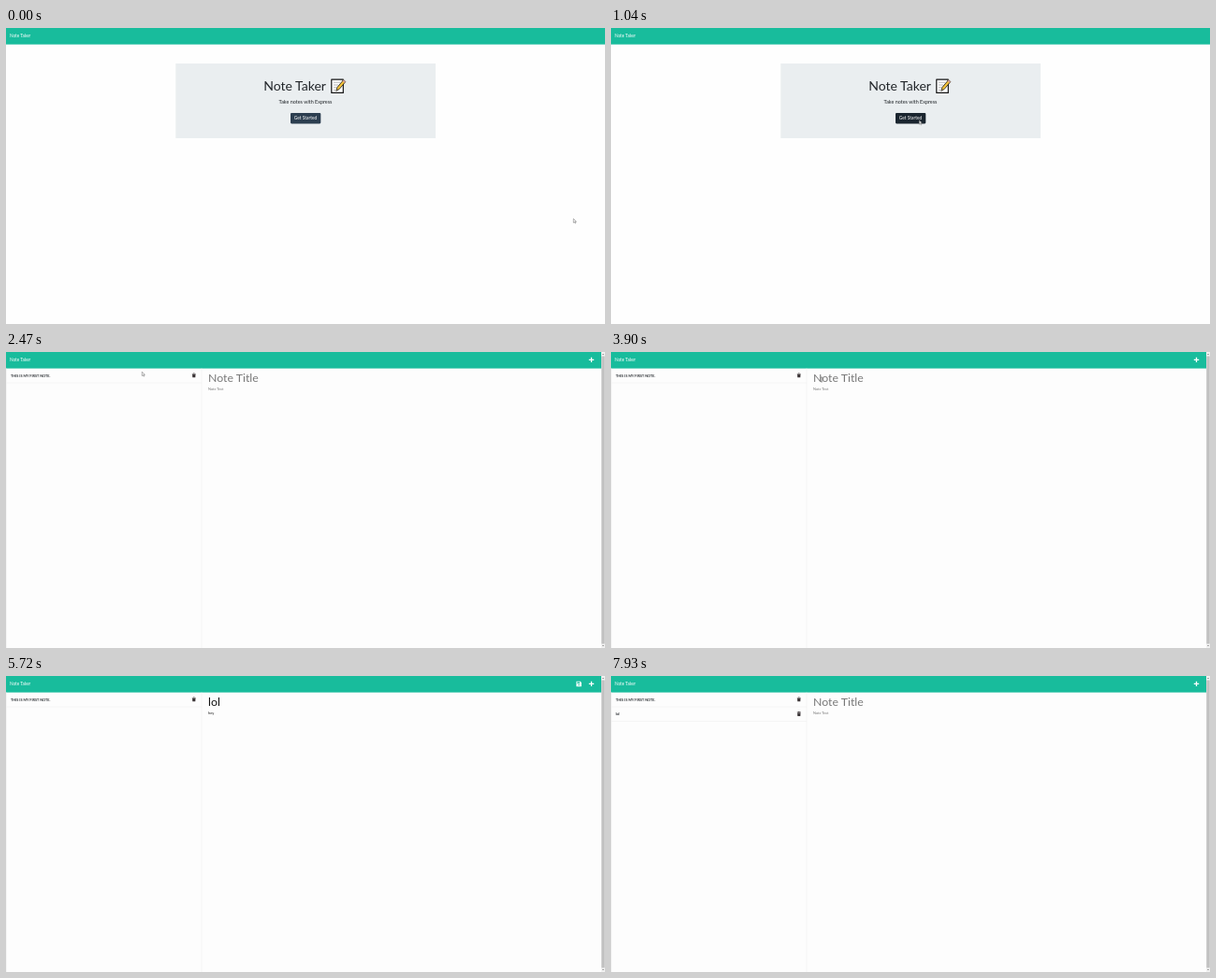
An HTML page that plays this animation: 640x317 px, repeating every 8 s.

```html
<!DOCTYPE html>
<html lang="en">
<head>
<meta charset="utf-8">
<title>Note Taker</title>
<style>
  html, body { margin: 0; width: 100%; height: 100%; overflow: hidden; background: #fefefe; }
  svg { display: block; width: 100vw; height: 100vh; font-family: Lato, sans-serif; }

  .anim { animation: 8s step-end infinite; }
  .landing { animation-name: landing; }
  .notes { animation-name: notes; }
  .icons { animation-name: icons; }
  .hover { animation-name: hover; }
  .title-hint { animation-name: title-hint; }
  .text-hint { animation-name: text-hint; }
  .save { animation-name: save; }
  .saved { animation-name: saved; }
  .t1 { animation-name: t1; }
  .t2 { animation-name: t2; }
  .t3 { animation-name: t3; }
  .b1 { animation-name: b1; }
  .b2 { animation-name: b2; }
  .b3 { animation-name: b3; }
  .move { animation-name: move; }
  .arrow { animation-name: arrow; }
  .beam { animation-name: beam; }

  /* pages */
  @keyframes landing { 0% { opacity: 1 } 14.625%, 100% { opacity: 0 } }
  @keyframes notes { 0% { opacity: 0 } 14.625%, 100% { opacity: 1 } }
  @keyframes icons { 0% { opacity: 0 } 16.25%, 100% { opacity: 1 } }
  @keyframes hover { 0% { fill: #2c3e50 } 11.375%, 100% { fill: #1a252f } }

  /* form and list */
  @keyframes title-hint { 0% { opacity: 1 } 53.625% { opacity: 0 } 91%, 100% { opacity: 1 } }
  @keyframes text-hint { 0% { opacity: 1 } 65% { opacity: 0 } 91%, 100% { opacity: 1 } }
  @keyframes save { 0% { opacity: 0 } 65% { opacity: 1 } 91%, 100% { opacity: 0 } }
  @keyframes saved { 0% { opacity: 0 } 91%, 100% { opacity: 1 } }

  /* typed letters */
  @keyframes t1 { 0% { visibility: hidden } 53.625% { visibility: visible } 91%, 100% { visibility: hidden } }
  @keyframes t2 { 0% { visibility: hidden } 56.875% { visibility: visible } 91%, 100% { visibility: hidden } }
  @keyframes t3 { 0% { visibility: hidden } 60.125% { visibility: visible } 91%, 100% { visibility: hidden } }
  @keyframes b1 { 0% { visibility: hidden } 65% { visibility: visible } 91%, 100% { visibility: hidden } }
  @keyframes b2 { 0% { visibility: hidden } 69.875% { visibility: visible } 91%, 100% { visibility: hidden } }
  @keyframes b3 { 0% { visibility: hidden } 71.5% { visibility: visible } 91%, 100% { visibility: hidden } }

  /* pointer */
  @keyframes move {
    0% { transform: translate(606px, 204px) }
    1.625% { transform: translate(606px, 204px); animation-timing-function: steps(7, start) }
    13% { transform: translate(329px, 98.5px) }
    21.125% { transform: translate(290px, 53px); animation-timing-function: steps(6, end) }
    30.875% { transform: translate(145px, 21px) }
    32.5% { transform: translate(145px, 21px); animation-timing-function: steps(6, end) }
    42.25% { transform: translate(225px, 27px) }
    86.125% { transform: translate(617.5px, 9px) }
    87.75% { transform: translate(612.5px, 8.5px) }
    95.875% { transform: translate(615px, 15px) }
    97.5%, 100% { transform: translate(619px, 24px) }
  }
  @keyframes arrow {
    0% { opacity: 1 } 14.625% { opacity: 0 }
    21.125% { opacity: 1 } 40.625% { opacity: 0 }
    86.125% { opacity: 1 } 99.125%, 100% { opacity: 0 }
  }
  @keyframes beam { 0% { opacity: 0 } 40.625% { opacity: 1 } 53.625%, 100% { opacity: 0 } }
</style>
</head>
<body>
<svg viewBox="0 0 640 317" preserveAspectRatio="none">
  <defs>
    <g id="trash" fill="#3c3638">
      <path d="M-2 -2H-.8L-.5 -2.5H.5L.8 -2H2V-1.4H-2Z"/>
      <path d="M-1.7 -1.1H1.7L1.5 2.3H-1.5Z"/>
    </g>
  </defs>

  <g class="anim landing">
    <rect width="640" height="317" fill="#fefefe"/>
    <rect width="640" height="17.6" fill="#18bc9c"/>
    <text x="4" y="10.4" font-size="4.7" fill="#fff">Note Taker</text>
    <rect x="181.3" y="38" width="277.7" height="80" fill="#eaeef0"/>
    <text x="275.3" y="67" font-size="14" fill="#212529">Note Taker</text>
    <g stroke-linejoin="round">
      <path d="M347.8 55.2H360.3V69.4H347.8Z" fill="#fff" stroke="#151515" stroke-width="1.2"/>
      <path d="M350 58.2H357M350 61H355M350 63.8H353M350 66.6H352" stroke="#999" stroke-width=".7"/>
      <path d="M352.8 67.3L353.9 63.6 360.6 55.6 362.8 57.5 356.1 65.5Z" fill="#f5c33b" stroke="#151515" stroke-width=".8"/>
      <path d="M359.6 56.8L360.6 55.6 362.8 57.5 361.8 58.7Z" fill="#d9a0a0"/>
    </g>
    <text x="320" y="81.3" font-size="5.43" fill="#212529" text-anchor="middle">Take notes with Express</text>
    <rect class="anim hover" x="304" y="91" width="32.3" height="11.4" rx="1.1"/>
    <text x="320" y="98.4" font-size="4.9" fill="#fff" text-anchor="middle">Get Started</text>
  </g>

  <g class="anim notes">
    <rect width="640" height="317" fill="#fdfdfd"/>
    <rect width="636" height="17.6" fill="#18bc9c"/>
    <text x="4" y="10.4" font-size="4.7" fill="#fff">Note Taker</text>
    <path d="M.4 17.6V317M209 17.6V317M0 33H209" fill="none" stroke="#f1f1f1" stroke-width=".7"/>
    <text x="5" y="26.6" font-size="3.8" font-weight="700" fill="#2b2f33">THIS IS MY FIRST NOTE.</text>

    <text class="anim title-hint" x="216" y="31.7" font-size="12.3" fill="#787878">Note Title</text>
    <text x="216" y="31.7" font-size="12.3" fill="#111"><tspan class="anim t1">l</tspan><tspan class="anim t2">o</tspan><tspan class="anim t3">l</tspan></text>
    <text class="anim text-hint" x="216" y="41.3" font-size="3.85" fill="#777">Note Text</text>
    <text x="216" y="41.3" font-size="3.85" fill="#111"><tspan class="anim b1">h</tspan><tspan class="anim b2">e</tspan><tspan class="anim b3">y</tspan></text>

    <g class="anim icons">
      <use href="#trash" x="200.8" y="25"/>
      <path d="M622.8 8.4H628.2M625.5 5.7V11.1" stroke="#fff" stroke-width="1.3"/>
    </g>
    <path class="anim save" fill="#fff" fill-rule="evenodd"
      d="M609.4 5.8H613.7L614.8 6.9V11.2H609.4ZM610.3 6.5V7.9H613.1V6.5ZM611.3 9.5A.8 .8 0 1 0 612.9 9.5A.8 .8 0 1 0 611.3 9.5Z"/>
    <g class="anim saved">
      <path d="M0 48.6H209" stroke="#f1f1f1" stroke-width=".7"/>
      <text x="5" y="42.2" font-size="3.8" font-weight="700" fill="#2b2f33">lol</text>
      <use href="#trash" x="200.8" y="40.6"/>
    </g>

    <rect x="636" width="4" height="317" fill="#f1f1f1"/>
    <rect x="636.3" y="4.5" width="3.4" height="308" fill="#c1c1c1"/>
    <path d="M637 3L638 1.7 639 3ZM637 314L638 315.3 639 314Z" fill="#777"/>
  </g>

  <g class="anim move">
    <path class="anim arrow" d="M.3 .3V4.5L1.3 3.6 2 5.2 2.8 4.8 2.1 3.3H3.4Z" fill="#fff" stroke="#555" stroke-width=".45"/>
    <path class="anim beam" d="M-.8 0H.8M0 0V5M-.8 5H.8" fill="none" stroke="#333" stroke-width=".5"/>
  </g>
</svg>
</body>
</html>
```
